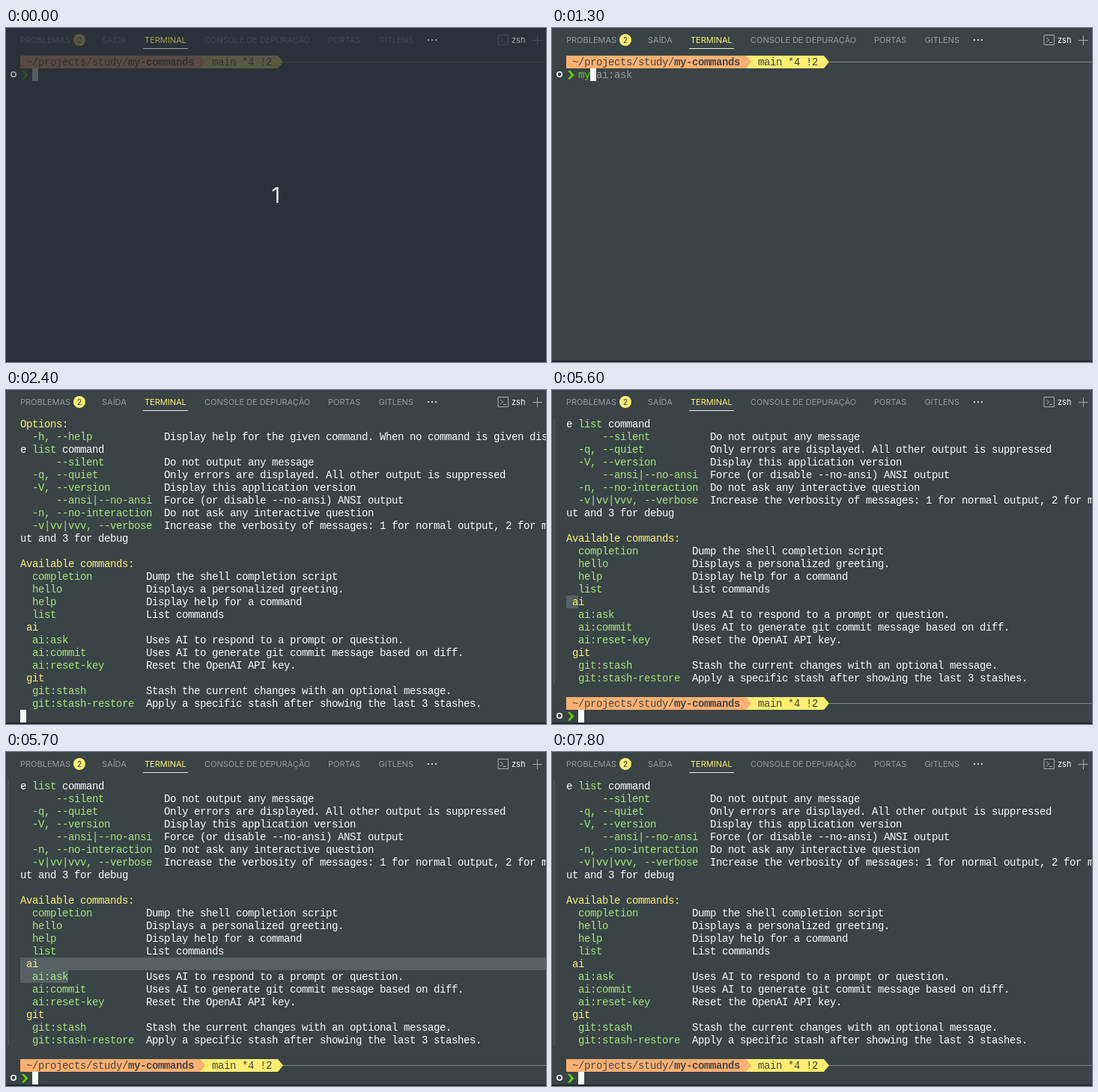
Animation, 721 px wide and 447 px high, one loop 8000 ms. Source, as an HTML page:

```html
<!DOCTYPE html>
<html lang="pt-BR">
<head>
<meta charset="utf-8">
<title>Terminal</title>
<style>
  html, body { margin: 0; width: 100%; height: 100%; overflow: hidden; background: #3a4446; }
  svg { display: block; width: 721px; height: 447px; }
  text { white-space: pre; }
  .ui { font: 11px Inter, sans-serif; }
  .mono { font: 14px "Liberation Mono", monospace; }
  .bold { font-weight: bold; }
</style>
</head>
<body>
<svg id="stage" viewBox="0 0 721 447" xmlns="http://www.w3.org/2000/svg"></svg>
<script>
const LOOP = 8000, LEFT = 19, TOP = 37, CELL = 8, ROW = 17;
const BG = '#3a4446', WHITE = '#f5fcf9', GREEN = '#a3e57e', YELLOW = '#ffee70',
      ORANGE = '#ffb070', GREY = '#929b9d', INK = '#414849', RED = '#ff6b68', LIME = '#5fd700';

const stage = document.getElementById('stage');

function add(parent, tag, attrs = {}, content) {
  const el = document.createElementNS(stage.namespaceURI, tag);
  for (const k in attrs) el.setAttribute(k, attrs[k]);
  if (content !== undefined) el.textContent = content;
  parent.appendChild(el);
  return el;
}

const group = (parent, attrs) => add(parent, 'g', attrs);
const box = (parent, x, y, width, height, fill) => add(parent, 'rect', { x, y, width, height, fill });
const label = (parent, x, text, fill) => add(parent, 'text', { x, y: 20, fill, class: 'ui' }, text);
const show = (el, on) => el.setAttribute('visibility', on ? 'inherit' : 'hidden');

// Terminal text: every character sits in its own cell.
function put(parent, row, col, text, fill, bold) {
  const x = [...text].map((_, i) => LEFT + (col + i) * CELL).join(' ');
  add(parent, 'text', { x, y: TOP + row * ROW + 13, fill, class: bold ? 'mono bold' : 'mono' }, text);
}

const cursor = (parent, row, col) =>
  box(parent, LEFT + col * CELL, TOP + row * ROW, CELL, ROW, WHITE);

box(stage, 0, 0, 721, 447, BG);

// Selection and hover bar behind the text
const select = [0, 1].map(i => box(stage, LEFT, 275 + i * ROW, 0, ROW, '#556163'));
const hoverBar = box(stage, 2, TOP, 2, 356, '#465153');

// Help output
const clip = add(add(stage, 'defs'), 'clipPath', { id: 'view' });
box(clip, 0, TOP, 721, 408, '#000');
const view = group(stage, { 'clip-path': 'url(#view)' });
const help = group(view);

const options = [
  [2, '-h, --help', 'Display help for the given command. When no command is given dis'],
  null,
  [6, '--silent', 'Do not output any message'],
  [2, '-q, --quiet', 'Only errors are displayed. All other output is suppressed'],
  [2, '-V, --version', 'Display this application version'],
  [6, '--ansi|--no-ansi', 'Force (or disable --no-ansi) ANSI output'],
  [2, '-n, --no-interaction', 'Do not ask any interactive question'],
  [2, '-v|vv|vvv, --verbose', 'Increase the verbosity of messages: 1 for normal output, 2 for m']
];
const commands = [
  ['completion', 'Dump the shell completion script'],
  ['hello', 'Displays a personalized greeting.'],
  ['help', 'Display help for a command'],
  ['list', 'List commands'],
  ['ai'],
  ['ai:ask', 'Uses AI to respond to a prompt or question.'],
  ['ai:commit', 'Uses AI to generate git commit message based on diff.'],
  ['ai:reset-key', 'Reset the OpenAI API key.'],
  ['git'],
  ['git:stash', 'Stash the current changes with an optional message.'],
  ['git:stash-restore', 'Apply a specific stash after showing the last 3 stashes.']
];

put(help, 0, 0, 'Options:', YELLOW);
options.forEach((o, i) => {
  if (!o) return;
  put(help, i + 1, o[0], o[1], GREEN);
  put(help, i + 1, 24, o[2], WHITE);
});
put(help, 2, 0, 'e', WHITE);
put(help, 2, 2, 'list', GREEN);
put(help, 2, 7, 'command', WHITE);
put(help, 9, 0, 'ut and 3 for debug', WHITE);
put(help, 11, 0, 'Available commands:', YELLOW);
commands.forEach(([name, about], i) => {
  put(help, i + 12, about ? 2 : 1, name, about ? GREEN : YELLOW);
  if (about) put(help, i + 12, 21, about, WHITE);
});
const waiting = cursor(stage, 23, 0);

// Prompt
const prompt = group(stage);
add(prompt, 'path', { d: 'M259 37H363L370 45.5L363 54H259Z', fill: YELLOW });
add(prompt, 'path', { d: 'M19 37H259L266 45.5L259 54H19Z', fill: ORANGE });
box(prompt, 370, 45, 351, 1, '#7c8784');
put(prompt, 0, 1, '~/projects/study/', INK);
put(prompt, 0, 18, 'my-commands', INK, true);
put(prompt, 0, 32, 'main *4 !2', INK);
add(prompt, 'path', { d: 'M21 57H24L29.5 62.7L24 68.5H21L25.5 62.7Z', fill: LIME });

// Typing states: empty, one letter, two letters, with the suggested rest in grey
const WORD = 'my ai:ask';
const typing = [0, 1, 2].map(n => {
  const g = group(prompt);
  cursor(g, 1, 2 + n);
  if (n) {
    put(g, 1, 2, WORD.slice(0, n), n < 2 ? RED : LIME);
    put(g, 1, 2 + n, WORD[n], BG);
    put(g, 1, 3 + n, WORD.slice(n + 1), GREY);
  }
  return g;
});

// Panel tabs
[[19, 'PROBLEMAS'], [128, 'SAÍDA'], [265, 'CONSOLE DE DEPURAÇÃO'], [430, 'PORTAS'], [497.5, 'GITLENS']]
  .forEach(([x, name]) => label(stage, x, name, GREY));
add(stage, 'circle', { cx: 98, cy: 16, r: 8, fill: YELLOW });
add(stage, 'text', { x: 98, y: 19.5, fill: '#30383a', 'text-anchor': 'middle', class: 'ui', style: 'font-size:10px' }, '2');
add(stage, 'path', {
  d: 'M657 9.5H670.5V22.5H657ZM660 13L663.5 16L660 19M664 19.5H668',
  fill: 'none', stroke: '#a4acad'
});
add(stage, 'path', { d: 'M703 16.5H716M709.5 10V23', stroke: '#a4acad' });
box(stage, 0, 445, 721, 2, '#202829');

// Countdown shade; the brighter items stay readable above it
const shade = group(stage);
box(shade, 0, 0, 721, 447, 'rgba(38,44,53,.77)');
add(shade, 'text', {
  x: 360.5, y: 233.5, fill: '#e6e8ea', 'text-anchor': 'middle',
  style: 'font:29px Inter, sans-serif'
}, '1');

const bright = group(stage);
label(bright, 185, 'TERMINAL', YELLOW);
box(bright, 183, 27, 60, 1, '#e8eee4');
[564, 569, 574].forEach(cx => add(bright, 'circle', { cx, cy: 16, r: 1.1, fill: WHITE }));
label(bright, 675, 'zsh', WHITE);
const mark = add(bright, 'circle', { cx: 10, cy: 62, r: 3.2, fill: 'none', stroke: WHITE, 'stroke-width': 1.6 });

function draw(t) {
  const intro = t < 100, output = t >= 2400, done = t >= 2500;
  const promptOn = !output || done;
  const drop = done ? 22 * ROW : 0;

  show(shade, intro);
  bright.setAttribute('opacity', intro ? 0.6 : 1);

  show(help, output);
  help.setAttribute('transform', `translate(0 ${done ? -2 * ROW : 0})`);
  show(waiting, output && !done);

  show(prompt, promptOn);
  show(mark, promptOn);
  prompt.setAttribute('transform', `translate(0 ${drop})`);
  mark.setAttribute('transform', `translate(0 ${drop})`);

  const typed = output || t < 1100 ? 0 : t < 1300 ? 1 : 2;
  typing.forEach((g, i) => show(g, i === typed));

  // Drag in 100 ms steps: two cells, then the whole line and part of the next
  const step = t < 5600 || t >= 7800 ? 0 : Math.min(3, 1 + Math.floor((t - 5600) / 100));
  select[0].setAttribute('width', [0, 2 * CELL, 702, 702][step]);
  select[1].setAttribute('width', [0, 0, 8, 13][step] * CELL);
  show(hoverBar, t >= 5600);
}

const start = performance.now();
function tick() {
  draw((performance.now() - start) % LOOP);
  requestAnimationFrame(tick);
}
tick();
</script>
</body>
</html>
```
